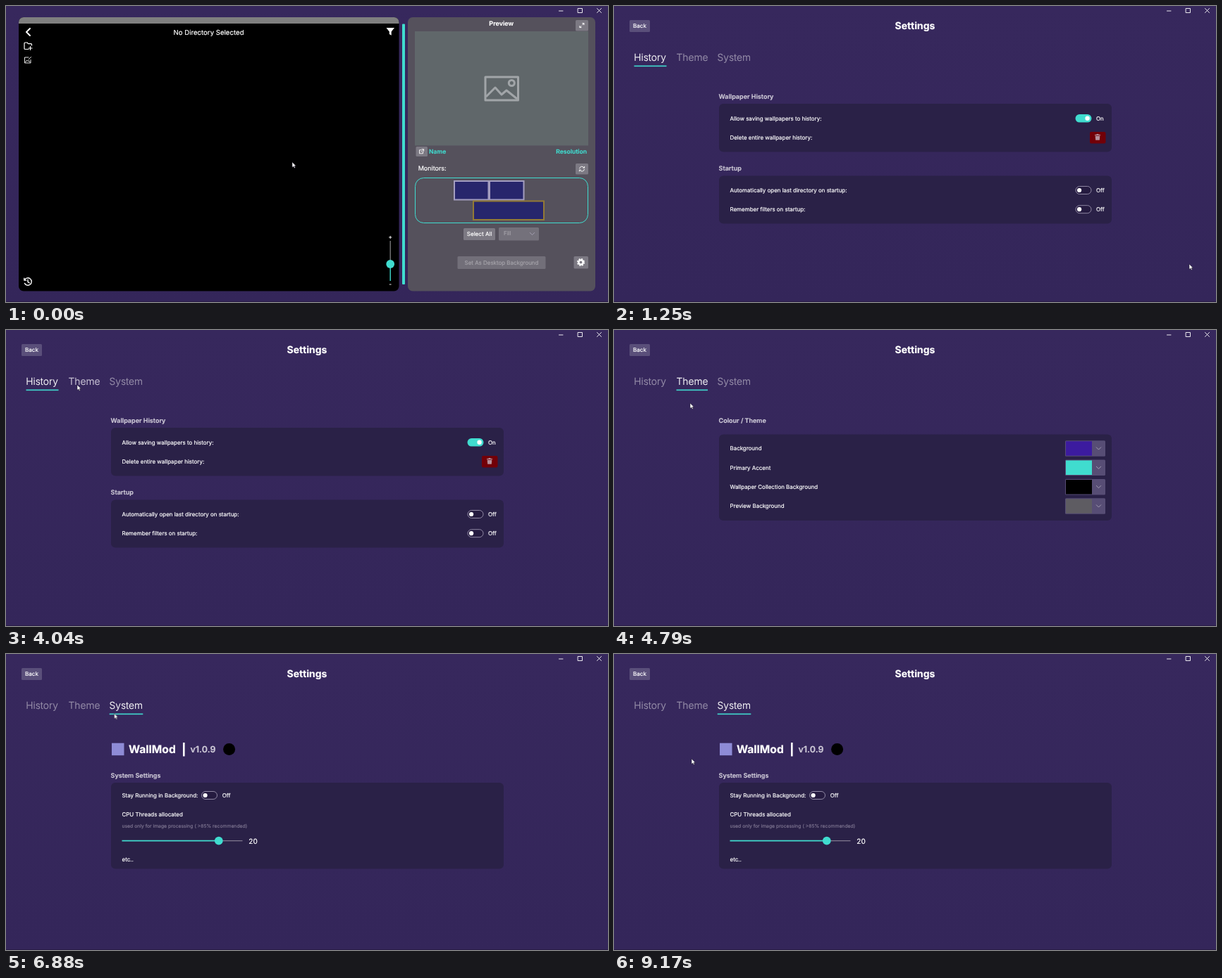
An HTML page that plays this animation: 854 by 421 pixels, repeating every 9210 ms.

```html
<!DOCTYPE html>
<html lang="en">
<head>
<meta charset="utf-8">
<title>Wallpaper settings tour</title>
<style>
html, body { margin: 0; width: 100%; height: 100%; overflow: hidden; background: #35275b; }
svg { display: block; }
#stage { width: 854px; height: 421px; }
:root { --accent: #40dccf; --loop: 9210ms; }

/* The thin stroke gives the text its slightly heavy rendering. */
text {
  font: 400 7.95px Inter, "Liberation Sans", sans-serif;
  color: #fff; fill: currentColor; stroke: currentColor; stroke-width: .2px;
  text-rendering: geometricPrecision;
}
.mid { text-anchor: middle; }
.end { text-anchor: end; }
.label { font-size: 9px; font-weight: 600; color: #d0ccd9; }
.meta { font-size: 8.6px; font-weight: 600; color: var(--accent); }
.faded { color: #a5a3aa; }
.tab { font-size: 13.8px; font-weight: 300; color: #9b93ad; }
.accent { fill: var(--accent); }
.button { fill: #7c7983; }
.card { fill: #2a2147; }
.line { fill: none; stroke: #fff; stroke-linecap: round; stroke-linejoin: round; }

#main, #settings, #history, #theme, #system { visibility: hidden; }
#main, #settings, #history, #theme, #system, .tab { animation: var(--loop) step-end infinite; }
#main { animation-name: main; }
#settings { animation-name: settings; }
#history { animation-name: history; }
#theme { animation-name: theme; }
#system { animation-name: system; }
#tabHistory { animation-name: tabHistory; }
#tabTheme { animation-name: tabTheme; }
#tabSystem { animation-name: tabSystem; }
#cursor { animation: cursor var(--loop) ease-in-out infinite; }

@keyframes main { 0% { visibility: visible } 13.57%, 100% { visibility: hidden } }
@keyframes settings { 0% { visibility: hidden } 13.57%, 100% { visibility: visible } }
@keyframes history { 0% { visibility: hidden } 13.57% { visibility: visible } 45.27%, 100% { visibility: hidden } }
@keyframes theme { 0% { visibility: hidden } 45.27% { visibility: visible } 72.85%, 100% { visibility: hidden } }
@keyframes system { 0% { visibility: hidden } 72.85%, 100% { visibility: visible } }
@keyframes tabHistory { 0% { color: #fff } 45.27%, 100% { color: #9b93ad } }
@keyframes tabTheme { 0% { color: #9b93ad } 40.2% { color: #d3cedd } 45.27% { color: #fff } 72.85%, 100% { color: #9b93ad } }
@keyframes tabSystem { 0% { color: #9b93ad } 68% { color: #d3cedd } 72.85%, 100% { color: #fff } }
@keyframes cursor {
  0%, .43% { transform: translate(406px, 222px) }
  10%, 11.3% { transform: translate(815px, 365px) }
  13.14%, 14% { transform: translate(816px, 367px) }
  21.28% { transform: translate(107px, 106px) }
  22.58% { transform: translate(105px, 105px) }
  24.43%, 34.42% { transform: translate(107px, 105px) }
  42.13%, 45.27% { transform: translate(101px, 78px) }
  52%, 58.41% { transform: translate(108px, 104px) }
  66.56% { transform: translate(153px, 92px); animation-timing-function: ease-out }
  70.58%, 72.85% { transform: translate(160px, 78px) }
  81.43% { transform: translate(93px, 146px) }
  83.71%, 93.16% { transform: translate(92px, 147px) }
  95%, 96.85% { transform: translate(94px, 147px) }
  99.57%, 100% { transform: translate(110px, 149px) }
}
</style>
</head>
<body>
<svg id="stage" viewBox="0 0 854 421">
  <defs>
    <linearGradient id="backdrop" x2="0" y2="1">
      <stop stop-color="#37285d"/><stop offset="1" stop-color="#34265a"/>
    </linearGradient>
    <g id="chevron"><path class="line" d="M-3.2-1.6 0 1.6 3.2-1.6" stroke-width=".9" style="stroke:#aaa5b8"/></g>
    <g id="switchOff">
      <rect x=".5" y=".5" width="22" height="11" rx="5.5" fill="#251b40" stroke="#aaa3bb" stroke-width=".8"/>
      <circle cx="5.6" cy="6" r="3.1" fill="#fff"/>
    </g>
    <g id="picker">
      <rect width="57" height="22.5" rx="1.5" fill="#574d75"/>
      <use href="#chevron" x="47.5" y="11.2"/>
    </g>
  </defs>

  <rect width="854" height="421" fill="url(#backdrop)"/>
  <rect y="420" width="854" height="1" fill="#281c46"/>
  <path class="line" stroke-width=".9" d="M784.5 7H790M811.5 3.5h6v6h-6zM838.5 3.5l6 6M844.5 3.5l-6 6"/>

  <g id="main">
    <rect x="18" y="16" width="539.5" height="389.5" rx="7"/>
    <path d="M18 25V23a7 7 0 0 1 7-7H550.5a7 7 0 0 1 7 7V25Z" fill="#7f7f7f"/>
    <text class="mid" x="287.5" y="41" style="font-size:9.65px">No Directory Selected</text>
    <path class="line" stroke-width="2" d="M34 32l-5 5 5 5"/>
    <path class="line" stroke-width="1.2" d="M32 61.5H27a1 1 0 0 1-1-1V53a1 1 0 0 1 1-1h3l1.5 1.7H35.5a1 1 0 0 1 1 1V56M34.5 57.5v5M32 60h5"/>
    <path class="line" stroke-width=".9" d="M32 73H26.5v8h8.5V76.5M27.5 80l2.2-3 1.6 1.7 1-1.2 1.7 2.5M32 76l3.5-3.5"/>
    <path d="M539.5 31h11.5l-4.3 5.5v5.2l-2.9-1.6V36.5Z" fill="#fff"/>
    <g transform="translate(31 392)">
      <path class="line" stroke-width="1.4" d="M-4.6-2.4A5.2 5.2 0 1 1-4.6 2.4M-5.2-4.8v2.9h2.9M0-2.8V.4l2.2 1.4"/>
    </g>
    <path class="line" stroke-width=".9" d="M543.5 329h3.4M545.2 327.3v3.4M544.2 396h2"/>
    <path d="M544.5 334h1.4v34h-1.4z" fill="#77777a"/>
    <path class="accent" d="M544.5 367h1.4v24h-1.4z"/>
    <circle class="accent" cx="545.2" cy="367" r="5.9"/>

    <rect class="accent" x="562" y="25.5" width="4" height="370.5" rx="1"/>
    <rect x="570" y="16" width="266" height="389.5" rx="7" fill="#55515c"/>
    <text class="label mid" x="702.7" y="28.3" style="color:#fff">Preview</text>
    <rect x="580" y="36" width="246" height="162.5" fill="#60676a"/>
    <rect class="button" x="808" y="20" width="18" height="15.5" rx="1.5"/>
    <path class="line" stroke-width="1" d="M817.8 26.7l2-2M817.8 24.6h2.1v2.1M816 28.6l-2 2M813.9 28.5v2.1H816"/>
    <g fill="none" stroke="#a1a5a8" stroke-width="3" stroke-linejoin="round">
      <rect x="680" y="101" width="46.5" height="33"/>
      <path d="M681 129l13-13 9 10 7-6 15 12"/>
      <circle cx="717.3" cy="109.5" r="4"/>
    </g>

    <rect class="button" x="581.5" y="200" width="16.5" height="14" rx="1.5"/>
    <path class="line" stroke-width=".9" d="M589 204.8h-2.5v5h5v-2.5M590 203.8h2.6v2.6M592.4 204l-3.6 3.6"/>
    <text class="meta" x="600" y="209.6">Name</text>
    <text class="meta end" x="824" y="209.6">Resolution</text>
    <text x="584.7" y="234.4" style="font-size:9px">Monitors:</text>
    <rect class="button" x="808" y="224" width="18" height="15.5" rx="1.5"/>
    <path class="line" stroke-width=".9" d="M813.6 231a3.4 3.4 0 0 1 6.3-1M820.4 232.4a3.4 3.4 0 0 1-6.3 1M820.6 228.4v1.8h-1.8M813.4 235v-1.8h1.8"/>
    <rect x="580.5" y="244.5" width="245" height="64" rx="12" fill="none" stroke="#40dccf"/>
    <g fill="#27266c" stroke="#a39dbf" stroke-width="2">
      <path d="M636 249h48.5v26.5H636zM686 249h48.5v26.5H686z"/>
      <path d="M663 277.5h100v26.5H663z" stroke="#937a35"/>
    </g>
    <rect class="button" x="649" y="316" width="45" height="17" rx="1.5"/>
    <text class="mid" x="671.6" y="327.2" style="font-size:8.15px">Select All</text>
    <rect x="699" y="315" width="57" height="18.5" rx="1.5" fill="#74717b"/>
    <text class="faded" x="706" y="326.4">Fill</text>
    <use href="#chevron" x="746.5" y="324"/>
    <rect x="640.5" y="356" width="125" height="18" rx="1.5" fill="#726f79"/>
    <text class="faded mid" x="703" y="367.5">Set As Desktop Background</text>
    <rect class="button" x="805.5" y="356" width="20.5" height="17.5" rx="1.5"/>
    <g fill="none" stroke="#fff" transform="translate(815.5 364.5)">
      <circle r="3.1" stroke-width="2.4"/>
      <circle r="4.7" stroke-width="1.6" stroke-dasharray="2.2 1.491"/>
    </g>
  </g>

  <g id="settings">
    <rect x="22" y="20" width="29" height="17" rx="1.5" fill="#5a4f7a"/>
    <text class="mid" x="36.4" y="31" style="font-size:8.15px">Back</text>
    <text class="mid" x="427" y="33.2" style="font-size:14px;font-weight:700">Settings</text>
    <text class="tab" id="tabHistory" x="28.3" y="78.4">History</text>
    <text class="tab" id="tabTheme" x="88.5" y="78.4">Theme</text>
    <text class="tab" id="tabSystem" x="146.6" y="78.4">System</text>
  </g>

  <g id="history">
    <rect class="accent" x="28.5" y="84.6" width="46" height="1.6"/>
    <text class="label" x="148.6" y="132">Wallpaper History</text>
    <rect class="card" x="149" y="139" width="557" height="68.5" rx="6"/>
    <text x="164.5" y="162.5">Allow saving wallpapers to history:</text>
    <rect class="accent" x="654.5" y="154" width="23" height="11.6" rx="5.8"/>
    <circle cx="671.6" cy="159.8" r="3.2" fill="#fff"/>
    <text x="684" y="162.5">On</text>
    <text x="164.5" y="189.7">Delete entire wallpaper history:</text>
    <rect x="675" y="179" width="22.5" height="16.5" rx="2" fill="#720008"/>
    <path fill="#b58f9a" d="M682 183h2.2l.6-1h2.4l.6 1H690v1.2h-8zM682.7 185h6.600l-.5 5.700h-5.600z"/>
    <text class="label" x="148.6" y="234.3">Startup</text>
    <rect class="card" x="149" y="241.5" width="557" height="68" rx="6"/>
    <text x="164.5" y="264.7">Automatically open last directory on startup:</text>
    <use href="#switchOff" x="654.5" y="256"/>
    <text x="684" y="264.7">Off</text>
    <text x="164.5" y="291.9">Remember filters on startup:</text>
    <use href="#switchOff" x="654.5" y="283.2"/>
    <text x="684" y="291.9">Off</text>
  </g>

  <g id="theme">
    <rect class="accent" x="88.5" y="84.6" width="44.5" height="1.6"/>
    <text class="label" x="148.6" y="132">Colour / Theme</text>
    <rect class="card" x="149" y="148.5" width="557" height="122.5" rx="6"/>
    <text x="164.5" y="171.4">Background</text>
    <text x="164.5" y="198.7">Primary Accent</text>
    <text x="164.5" y="226">Wallpaper Collection Background</text>
    <text x="164.5" y="253.3">Preview Background</text>
    <use href="#picker" x="640" y="157.3"/>
    <use href="#picker" x="640" y="184.6"/>
    <use href="#picker" x="640" y="211.9"/>
    <use href="#picker" x="640" y="239.2"/>
    <path d="M641 158.3h37v20.5h-37z" fill="#3c1b9f"/>
    <path d="M641 185.6h37v20.5h-37z" class="accent"/>
    <path d="M641 212.9h37v20.5h-37z"/>
    <path d="M641 240.2h37v20.5h-37z" fill="#5e5c62"/>
  </g>

  <g id="system">
    <rect class="accent" x="146.7" y="84.6" width="47.6" height="1.6"/>
    <rect x="150" y="126.7" width="17.5" height="17.5" fill="#8e8bd6"/>
    <text x="174" y="141.2" style="font-size:15.6px;font-weight:700">WallMod</text>
    <rect x="251" y="126" width="2.6" height="19.5" fill="#fff"/>
    <text class="label" x="261.5" y="140.4" style="font-size:12.5px">v1.0.9</text>
    <circle cx="316.6" cy="135.5" r="8.5"/>
    <text class="label" x="148.6" y="175.6">System Settings</text>
    <rect class="card" x="149" y="183" width="557" height="122.5" rx="6"/>
    <text x="164.5" y="203.8">Stay Running in Background:</text>
    <use href="#switchOff" x="277" y="195"/>
    <text x="306.7" y="203.8">Off</text>
    <text x="164.5" y="231.3">CPU Threads allocated</text>
    <text x="164.5" y="247.4" style="font-size:6.8px;color:#7c738f">used only for image processing ( &gt;85% recommended)</text>
    <path d="M302 264.9h33.5v1.4H302z" fill="#81798f"/>
    <path class="accent" d="M164.5 264.8H302v1.6H164.5z"/>
    <circle class="accent" cx="301.8" cy="265.6" r="5.9"/>
    <text x="344.3" y="269.5" style="font-size:10px">20</text>
    <text x="164.5" y="294.5">etc..</text>
  </g>

  <path id="cursor" d="M0 0V7.6L1.8 6 3 8.6 4.3 8 3.1 5.5H5.4Z" fill="#fff" stroke="#1a1426" stroke-width=".5"/>
</svg>
</body>
</html>
```
